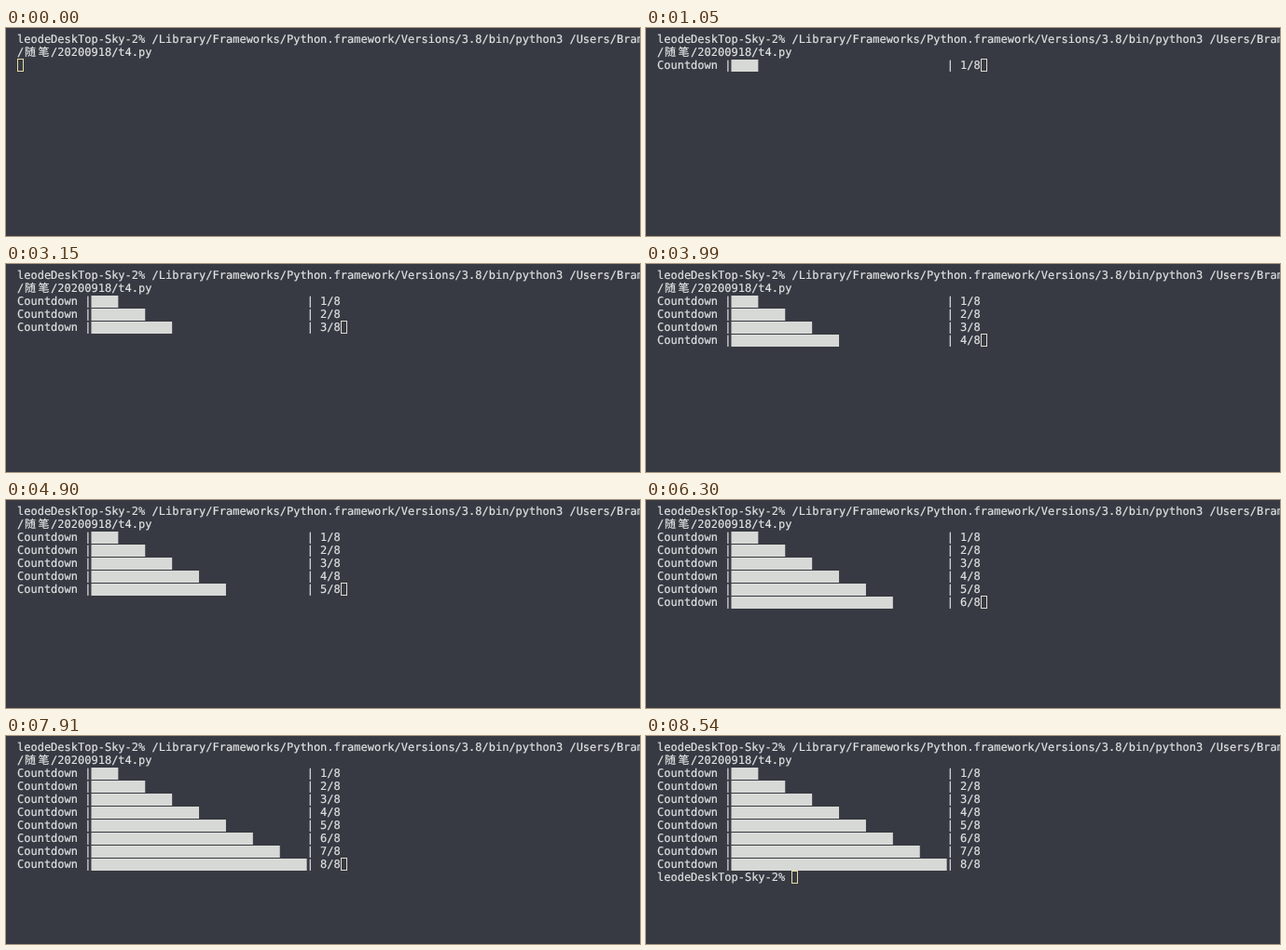
Animation, 680 px wide and 224 px high, one loop 8960 ms. Source, as an HTML page:

```html
<!DOCTYPE html>
<html>
<head>
<meta charset="utf-8">
<style>
html, body { margin: 0; width: 100%; height: 100%; overflow: hidden; background: #373a42; }
svg { display: block; }
text {
  font: 12px "DejaVu Sans Mono", "Noto Sans CJK SC", "Noto Sans CJK", monospace;
  fill: #e0e3e3; stroke: #e0e3e3; stroke-width: .2px;
  white-space: pre; text-rendering: geometricPrecision;
}
.bar { fill: #d6d9d5; }
#cursor { fill: none; stroke-width: 1; }
</style>
</head>
<body>
<svg width="680" height="224" viewBox="0 0 680 224"></svg>
<script>
const LOOP = 8960, TICK = 70, FIRST = 365, PERIOD = 1004;
const TOTAL = 8, CELL = 7.224, LINE = 14;
const PROMPT = 'leodeDeskTop-Sky-2% ';
const svg = document.querySelector('svg');
const colX = col => 12 + col * CELL;
const rowY = row => 5 + row * LINE;

function add(tag, attrs, parent = svg, content = '') {
  const el = document.createElementNS('http://www.w3.org/2000/svg', tag);
  for (const key in attrs) el.setAttribute(key, attrs[key]);
  el.textContent = content;
  return parent.appendChild(el);
}

function write(row, col, content, parent) {
  add('text', { x: colX(col), y: rowY(row) + 11 }, parent, content);
}

write(0, 0, PROMPT + '/Library/Frameworks/Python.framework/Versions/3.8/bin/python3 /Users/Bram');
write(1, 0, '/');
write(1, 1.1, '随');
write(1, 3.1, '笔');
write(1, 5, '/20200918/t4.py');

// Each step adds one line of output; the last one is the new prompt.
const steps = [];
for (let n = 1; n <= TOTAL; n++) {
  const g = add('g', {}), row = n + 1;
  write(row, 0, 'Countdown |', g);
  add('rect', { class: 'bar', x: colX(11), y: rowY(row) + 1, width: n * 4 * CELL, height: 13 }, g);
  write(row, 43, `| ${n}/${TOTAL}`, g);
  steps.push(g);
}
const last = add('g', {});
write(TOTAL + 2, 0, PROMPT, last);
steps.push(last);

const cursor = add('rect', { id: 'cursor', width: 6, height: 13 });

function draw(now) {
  const t = Math.floor(now % LOOP / TICK) * TICK;
  const done = t < FIRST ? 0 : Math.min(TOTAL + 1, Math.floor((t - FIRST) / PERIOD) + 1);
  steps.forEach((g, i) => g.setAttribute('visibility', i < done ? 'visible' : 'hidden'));

  const counting = done > 0 && done <= TOTAL;
  const col = counting ? 48 : done ? PROMPT.length : 0;
  cursor.setAttribute('x', Math.round(colX(col)) + .5);
  cursor.setAttribute('y', rowY(Math.max(done, 1) + 1) + .5);
  cursor.setAttribute('stroke', counting ? '#dcdcd2' : '#e6dca6');
}

const start = performance.now();
function frame() {
  draw(performance.now() - start);
  requestAnimationFrame(frame);
}
frame();
</script>
</body>
</html>
```
